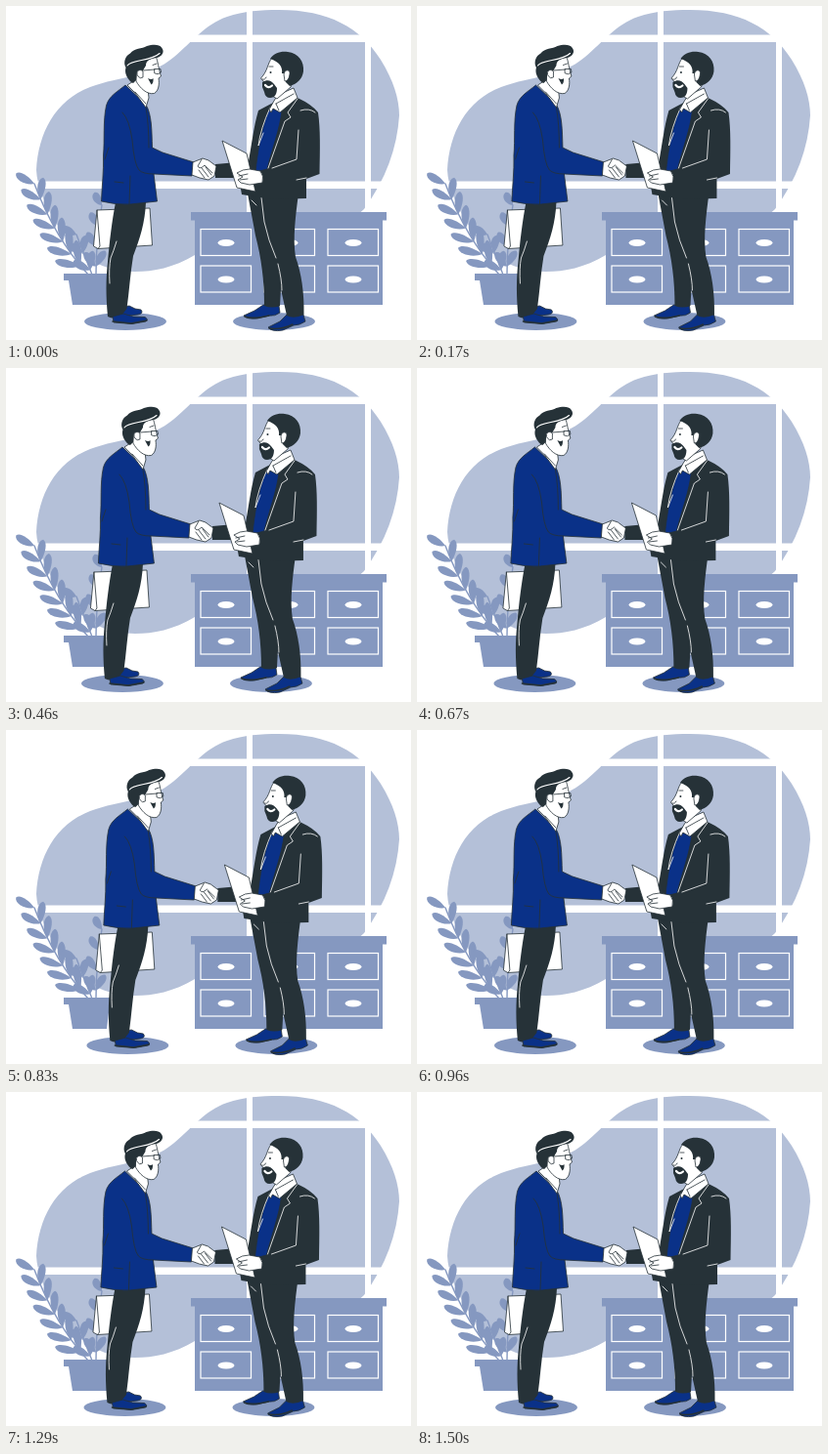
These frames come from a looping animation (414 by 342 pixels, 1540 ms). An HTML page:

```html
<!DOCTYPE html>
<html lang="en">
<head>
<meta charset="utf-8">
<title>Handshake</title>
<style>
  html, body { margin: 0; width: 100%; height: 100%; overflow: hidden; background: #fff; }
  svg { display: block; width: 414px; height: 342px; }
  .pale { fill: #b4c0d8; }
  .mid { fill: #8598c0; }
  .dark { fill: #263238; }
  .blue { fill: #0a3188; stroke: #263238; stroke-width: .8; }
  .white { fill: #fff; stroke: #263238; stroke-width: .8; }
  .ink, .chalk, .stem, .drawer { fill: none; stroke-width: .8; stroke-linecap: round; }
  .ink { stroke: #263238; }
  .chalk { stroke: #fff; }
  .drawer { stroke: #fff; stroke-width: 1.2; }
  .stem { stroke: #8598c0; stroke-width: 1.4; }
  path { stroke-linejoin: round; }
</style>
</head>
<body>
<svg viewBox="0 0 414 342">
  <path class="pale" d="M31 168C33 130 50 97 86 83C118 71 146 74 172 52C190 37 203 19 226 11C243 5 260 4 279 4C330 4 362 22 383 55C396 76 402 95 402 112C400 145 388 178 366 208C354 219 346 222 326 225C270 231 224 237 193 255C171 268 151 272 132 272C92 272 67 250 50 220C39 202 32 185 31 168Z"/>
  <path fill="#fff" d="M246 0h6v212h-6zM367 0h6v212h-6zM180 29.500h225v7.500h-225zM25 179.500h380v7.500h-380z"/>

  <g id="plant"></g>
  <path class="mid" d="M59 274H108V281H106L103 306H68L64 281H59Z"/>

  <g id="cabinet">
    <path class="mid" d="M189 211H389V219.500H385V306H193V219.500H189Z"/>
  </g>

  <g id="people">
    <ellipse class="mid" cx="122" cy="323" rx="42" ry="9"/>
    <ellipse class="mid" cx="274" cy="323" rx="42" ry="9"/>

    <!-- left man -->
    <path class="white" d="M93 209L147 207L149.500 245L94 248.500L89.500 246Z"/>
    <path class="ink" d="M93 209L96 246L94 248.500"/>
    <path class="blue" d="M119 308L126 307L132 310L138 311Q141 315 135 316L118 318Z"/>
    <path class="dark" d="M112 201H143C142 222 137 238 130 256C127 274 126 292 123.500 310L117 318Q110 321 104 318C102 297 102 280 104 262C106 240 108 222 112 201Z"/>
    <path class="chalk" d="M113 241Q110 251 107 258Q105 268 106 284"/>
    <path class="blue" d="M109 318L120 315L130 318L142 318.500Q146 321 143 323L129 325.500L110 324Z"/>
    <path class="ink" d="M109 323L128 325L144 322" style="stroke-width:1.500"/>

    <path class="blue" d="M122 81C115 87 105 92 102.500 102C99 118 101 137 99.500 153C100 170 98 184 97.500 200Q113 204 127 203L154.500 200L151 172L190 174L192 160L160 150L149.500 145C149 127 149 111 143 101Z"/>
    <path class="ink" d="M119 109Q126 116 129 137Q131 162 136 168Q140 172 151 172M126 203L127 174M105 145L101 157M111 180L120 181M143 104Q146 121 146 145"/>

    <path class="white" d="M124 81L135 74L145 85L146 94L143 104L132 89Z"/>
    <path class="ink" d="M132 88L143 100"/>
    <path class="white" d="M133 58L153 51C155.500 57 155.500 63 158.500 72L156 74C157 80 156 87 151.500 89.500C144 91 137 84 133 77Z"/>
    <path class="dark" d="M128 78C123 73 121 68 122.500 63C119.500 58 122 51 127 48.500C131 43 139 44 144 41C150 39 157 39 159 42.500C163 47 159 52 154 53C147 54 143 56 143 61L140 66L134 67L133 76L130 79Z"/>
    <path class="chalk" d="M124 61C129 54 148 57 157 48.500" style="stroke-width:1.100"/>
    <path class="white" d="M140 67C136 63 132 68 135 72Q137 75 140 73Z"/>
    <path class="ink" d="M140 66L152 65M152 64.500L158 64.500L158.500 68Q155 71 152 69ZM150 60.500L154 59"/>
    <path class="dark" d="M145 74Q149 76 150.500 74Q151 79 148.500 80.500Z"/>

    <!-- right man -->
    <path class="blue" d="M243 317L254 312L263 306L279 307L280 314Q275 318 269 317L257 320Q246 321 243 317Z"/>
    <path class="blue" d="M268 329L280 323L287 316L304 316L306 323Q300 327 294 327L283 332Q271 334 268 329Z"/>
    <path class="dark" d="M247 192H299C296 215 293 237 296 257C302 273 305 294 304.500 316Q294 321 287 317L281 290L280 307Q272 310 264 307C264 281 261 258 255 235Z"/>
    <path class="chalk" d="M261 196L264 221Q268 240 276 258M278 264Q282 280 282 291M251 199L256 204"/>
    <path class="ink" d="M244 318Q252 321 269 317M269 330Q281 332 293 326" style="stroke-width:1.500"/>

    <path class="dark" d="M273 99L258 107C253 124 251 143 248 159L214 162L214 176L238 176L241 193L272 198L307 197L307 177L320.500 172C321 147 321.500 126 319 109Q313 101 298 94Z"/>
    <path class="blue" d="M271 105L282 107C280 126 272 146 267 167L255 170C257 150 261 126 268 108Z"/>
    <path class="chalk" d="M270 104Q260 126 258 143L263 130M298 95L288 109L291 114L285 118L268 166M299 127L297 157L272 166M307 176L297 178M301 107Q310 104 316 109"/>
    <path class="white" d="M274 97L278 91L294 84L298 94L280 109L273 105L271 109L269 106Z"/>
    <path class="ink" d="M276 100L279 107M276 100L294 90"/>

    <path class="white" d="M272 53C267 59 268 66 260.500 74L264 78L265 88L277 95L291 83L298 66L289 52Z"/>
    <path class="dark" d="M270 54C274 48 281 46 288 47C299 48 305 57 304 67C303 75 297 80 290 82L286 78L285 69L282 69C283 62 279 57 270 54Z"/>
    <path class="dark" d="M262 78C267 75 271 76 274 80L277 84C277 90 275 94 270 94Q265 94 264 88L262 83Z"/>
    <path class="white" d="M284 70C285 64 291 65 290 70Q289 77 285 77Z"/>
    <path class="chalk" d="M265 81Q268 85 272 81.500" style="stroke-width:2.200"/>
    <path class="ink" d="M269 62L273 62M266 73Q265 76 262 75"/>
    <circle class="dark" cx="270.500" cy="68" r="1"/>

    <path class="white" d="M221 138L246 151L255 190L236 186Z"/>
    <path class="white" d="M236 171Q242 167 249 167L260 169Q264 174 262 181L249 183L240 181L237 178L242 175Z"/>
    <path class="ink" d="M238 174L247 172M239 178L247 177"/>

    <!-- clasped hands -->
    <path class="white" d="M191 160L201 156L207 158L215 164L213 174L207 178L198 176L190 173Z"/>
    <path class="ink" d="M200 157L196 164Q198 168 203 163L211 171M197 168L203 176M200 166L207 175M204 165L210 173"/>
  </g>
</svg>
<script>
const byId = id => document.getElementById(id);

function add(parent, tag, attrs) {
  const el = document.createElementNS("http://www.w3.org/2000/svg", tag);
  for (const key in attrs) el.setAttribute(key, attrs[key]);
  parent.append(el);
}

for (const x of [199, 264, 329]) {
  for (const y of [228.5, 266]) {
    add(byId("cabinet"), "rect", { class: "drawer", x, y, width: 51.500, height: 27 });
    add(byId("cabinet"), "ellipse", { fill: "#fff", cx: x + 26, cy: y + 14, rx: 8.5, ry: 3.5 });
  }
}

// A curved stem with leaves on both sides, shrinking towards the tip.
function frond([x0, y0], [x1, y1], [x2, y2], pairs, size) {
  const plant = byId("plant");
  add(plant, "path", { class: "stem", d: `M${x0} ${y0}Q${x1} ${y1} ${x2} ${y2}` });
  const leaf = (x, y, angle, length) => add(plant, "path", {
    class: "mid",
    d: `M0 0C${length * .3} -6 ${length * .9} -6.5 ${length} 0C${length * .9} 5 ${length * .4} 4 0 0Z`,
    transform: `translate(${x} ${y}) rotate(${angle})`
  });
  for (let i = 0; i <= pairs; i++) {
    const t = .12 + .88 * i / pairs, u = 1 - t;
    const x = u * u * x0 + 2 * u * t * x1 + t * t * x2;
    const y = u * u * y0 + 2 * u * t * y1 + t * t * y2;
    const dx = u * (x1 - x0) + t * (x2 - x1), dy = u * (y1 - y0) + t * (y2 - y1);
    const angle = Math.atan2(dy, dx) * 180 / Math.PI;
    const length = size * (1 - .2 * t);
    leaf(x, y, angle - 40, length);
    if (i < pairs) leaf(x, y, angle + 30, length);
  }
}
frond([84, 275], [50, 238], [29, 182], 6, 27);
frond([88, 275], [80, 255], [72, 234], 2, 20);
frond([92, 275], [92, 240], [98, 204], 3, 19);

// CSS "ease" curve, solved by bisection.
function ease(x) {
  const bezier = (s, a, b) => 3 * s * (1 - s) ** 2 * a + 3 * s * s * (1 - s) * b + s ** 3;
  let low = 0, high = 1;
  for (let i = 0; i < 20; i++) {
    const s = (low + high) / 2;
    if (bezier(s, .25, .25) < x) low = s; else high = s;
  }
  return bezier(low, .1, 1);
}

const LOOP = 1540, FPS = 24, STEPS = 36, UNIT = .828;
const sway = [0, -1, 2, -4, 4, -4, 4, -4, 2, -1, 0];

function draw(now) {
  const step = Math.min(STEPS, Math.floor((now % LOOP) * FPS / 1000 + .2));
  const pos = step / STEPS * 10, i = Math.min(9, Math.floor(pos));
  const shift = sway[i] + (sway[i + 1] - sway[i]) * ease(pos - i);
  byId("people").setAttribute("transform", `translate(${shift * UNIT} 0)`);
}

const start = performance.now();
function tick() {
  draw(performance.now() - start);
  requestAnimationFrame(tick);
}
tick();
</script>
</body>
</html>
```
